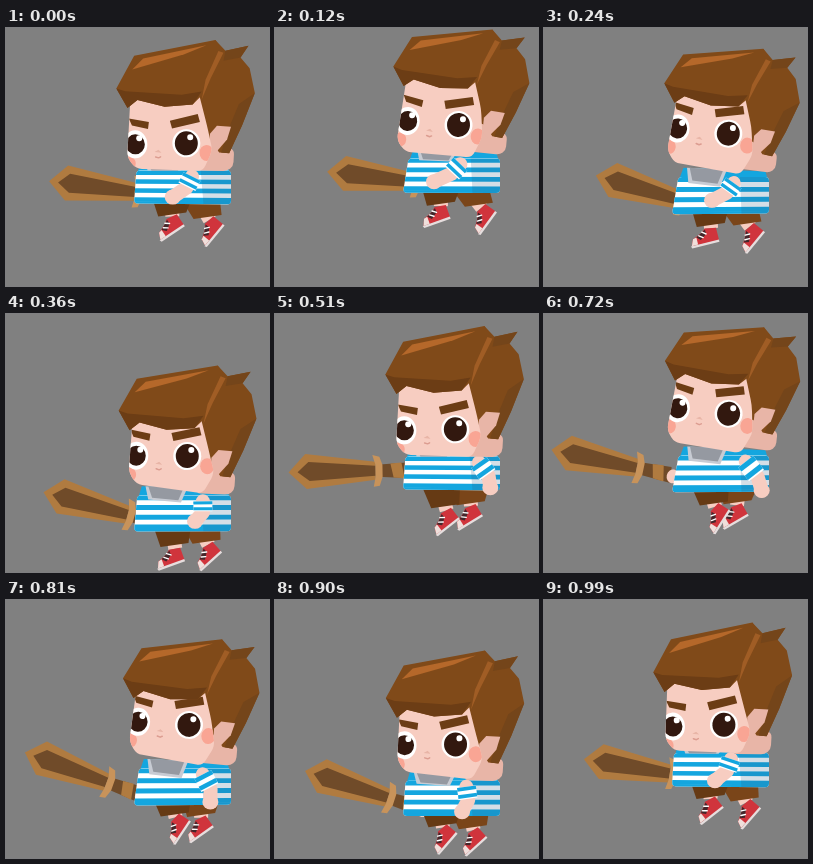
Recreate the animation shown at these times as an HTML page. Size 263 px wide and 258 px high, loop 1020 ms.

```html
<!DOCTYPE html>
<html lang="en">
<head>
<meta charset="utf-8">
<title>Running boy with a wooden sword</title>
<style>
html, body { margin: 0; width: 100%; height: 100%; overflow: hidden; background: #808080; }
svg { display: block; width: 100%; height: 100%; }
</style>
</head>
<body>
<svg id="stage" viewBox="0 0 263 258"></svg>
<script>
const LOOP = 1020, STEP = 30, HOP = LOOP / 2;
const SKIN = '#f7cdc1', SHADE = '#e8b5a7', HAIR = '#804a19', BACK = '#74451a', DARK = '#6c3d15',
  LIGHT = '#b5682a', BLUE = '#14a6df', RED = '#d0343c', PUPIL = '#32180f',
  WOOD = '#b07b40', CORE = '#704b29';

// Swing around a mean, highest at the peak time.
const wave = (t, mean, amp, peak, period = LOOP) => mean + amp * Math.cos(2 * Math.PI * (t - peak) / period);

// The body hops twice per loop, the limbs swing once.
function pose(t) {
  const rise = wave(t, 11, 26, 365, HOP) + wave(t, 0, -4, 0, HOP / 2);
  const sway = wave(t, 3, 6, 200, HOP);
  const nod = wave(t, 8.5, -8.5, 15, HOP);
  const shoulder = [wave(t, 195, -10, 75), 147];
  const hand = [wave(t, 191, -32, 115), wave(t, 170, 6, 700)];
  return {
    rise, sway, nod, shoulder, hand,
    elbow: [(shoulder[0] + hand[0]) / 2 + 4, (shoulder[1] + hand[1]) / 2 + 1],
    sword: [wave(t, 116, 24, 150), wave(t, 159, 6, 150), wave(t, 10, 9, 310, HOP) + wave(t, 0, 4, 0)],
    left: [wave(t, 167, -7, 180), wave(t, 203.5, -4, 0), wave(t, -36, 22, 240)],
    right: [wave(t, 199, 10, 150), 203, wave(t, -41, -13, 120)]
  };
}

const mix = (a, b, s) => [a[0] + (b[0] - a[0]) * s, a[1] + (b[1] - a[1]) * s];
const poly = (pts, fill, extra = '') => `<polygon points="${pts}" fill="${fill}" ${extra}/>`;
const oval = (x, y, rx, ry, fill) => `<ellipse cx="${x}" cy="${y}" rx="${rx}" ry="${ry}" fill="${fill}"/>`;
const line = (pts, color, width, cap = 'round') =>
  `<polyline points="${pts.join(' ')}" fill="none" stroke="${color}" stroke-width="${width}" stroke-linecap="${cap}" stroke-linejoin="round"/>`;
const group = (transform, body) => `<g transform="${transform}">${body}</g>`;
const place = (x, y, angle) => `translate(${x} ${y}) rotate(${angle})`;

// Closed path with softened corners.
function soft(pts, radius) {
  const n = pts.length;
  const toward = (a, b) => mix(a, b, Math.min(0.5, radius / Math.hypot(b[0] - a[0], b[1] - a[1])));
  return pts.map((p, i) =>
    `${i ? 'L' : 'M'}${toward(p, pts[(i + n - 1) % n])}Q${p} ${toward(p, pts[(i + 1) % n])}`).join('') + 'Z';
}

// Affine matrix from the resting hair corners: left, top and right.
function hairMatrix(sway, rise) {
  const ux = 99, uy = -48, vx = 138, vy = 5, det = ux * vy - uy * vx;
  const solve = (p, q) => [(p * vy - q * uy) / det, (q * ux - p * vx) / det];
  const lx = 112 + sway, ly = 57 + rise - 1.2 * sway;
  const tx = 211 + sway, ty = 11 + rise + 0.2 * sway;
  const rx = 250 + 0.7 * sway, ry = 63 + rise + 0.3 * sway;
  const [a, c] = solve(tx - lx, rx - lx), [b, d] = solve(ty - ly, ry - ly);
  return [a, b, c, d, lx - a * 112 - c * 57, ly - b * 112 - d * 57];
}
const apply = ([a, b, c, d, e, f], [x, y]) => [a * x + c * y + e, b * x + d * y + f];

function turn(x, y, angle, [px, py]) {
  const r = angle * Math.PI / 180, c = Math.cos(r), s = Math.sin(r);
  return [x + px * c - py * s, y + px * s + py * c];
}

// Drawn around the guard, blade to the left.
function sword([x, y, angle]) {
  return group(place(x, y, angle),
    poly('0,-6 33,-8 36,8 0,6', CORE) +
    poly('14,-7 25,-8 28,8 17,7', WOOD) +
    oval(36, 1, 6, 7, SKIN) +
    poly('-88,0 -71,-18 -1,-9 -1,9 -70,17', WOOD) +
    poly('-79,0 -68,-10 -1,-5 -1,5 -67,9', CORE) +
    poly('-4,-16 3,-14 6,-6 6,6 3,15 -3,16 -1,6 -1,-6', '#c8935a'));
}

function shoe([x, y, angle]) {
  return group(place(x, y, angle) + ' scale(.93)',
    poly('-15,4 -12,-3 -2,-7 3,-11 15,-9 15,5', RED) +
    poly('-16,4 15,4 15,6.5 -15,6.5', '#e6dede') +
    poly('-15,4 -12,-3 -8,-4 -8,4', '#f0dfdb') +
    poly('-8,-4 -2,-7 3,-10 3,-5 -4,0', '#43262a') +
    line([[-5, -5], [-1, -2]], '#fff', 1.5) + line([[-1, -8], [3, -5]], '#fff', 1.5));
}

function leg(hip, foot, color) {
  const ankle = turn(...foot, [9, -9]), hem = mix(hip, ankle, 0.75);
  const shorts = [[hip[0] - 19, hip[1] - 4], [hip[0] + 19, hip[1] - 4], [hem[0] + 14, hem[1] - 1], [hem[0] - 14, hem[1] + 3]];
  return line([hip, ankle], SKIN, 14, 'butt') + shoe(foot) + poly(shorts.join(' '), color);
}

function shirt(sway, nod) {
  const tl = [131 + 0.4 * sway, 141], bl = [128, 174 + 0.25 * nod];
  const tr = [225, 141], br = [225, 175 + 0.15 * nod];
  const at = (u, v) => mix(mix(tl, tr, u), mix(bl, br, u), v);
  const area = (...uv) => uv.map(p => at(...p)).join(' ');
  const d = soft([tl, tr, br, bl], 4);
  let bands = '';
  for (let i = 0; i < 7; i += 2)
    bands += poly(area([-0.1, i / 7.4], [1.1, i / 7.4], [1.1, (i + 1) / 7.4], [-0.1, (i + 1) / 7.4]), BLUE);
  bands += poly(area([-0.1, 0.93], [1.1, 0.93], [1.1, 1.1], [-0.1, 1.1]), BLUE);
  const collar = 0.016 * nod;
  return poly(area([0.04, -0.25], [0.96, -0.15], [0.99, 0.1], [0.01, 0.1]), BLUE) +
    `<clipPath id="shirt"><path d="${d}"/></clipPath><path d="${d}" fill="#fff"/>` +
    `<g clip-path="url(#shirt)">${bands}` +
    poly(area([0.68, 0], [1.1, 0], [1.1, 1.1], [0.72, 1.1]), '#2b5d82', 'opacity=".2"') + '</g>' +
    poly(area([0.08, -0.25], [0.53, -0.2], [0.47, collar], [0.12, collar * 0.6]), '#c7cbd3') +
    poly(area([0.11, -0.25], [0.49, -0.2], [0.44, collar * 0.7], [0.16, collar * 0.35]), '#9599a1');
}

function arm({ shoulder, elbow, hand }) {
  const end = mix(shoulder, elbow, 0.9);
  let body = line([shoulder, elbow, hand], SKIN, 14) + oval(...hand, 8, 7.5, SKIN) +
    line([shoulder, end], '#fff', 19, 'butt');
  for (const s of [0, 0.6])
    body += line([mix(shoulder, end, s), mix(shoulder, end, s + 0.3)], BLUE, 19, 'butt');
  return body;
}

function features(x, y, tilt) {
  const eye = (ex, rx, r) => oval(ex, 0, rx, 14, '#fff') + oval(ex, 0, r, r + 0.5, PUPIL) + oval(ex + 4, -6, 3, 3, '#fff');
  return group(place(x, y, tilt),
    oval(20, 10, 7, 8, '#f9a594') + oval(-57, 19, 6, 7, '#f9a594') +
    eye(-51, 12, 9.5) + eye(0, 14, 11.5) +
    poly('-57,-26 -37,-22 -38,-15 -54,-19', DARK) +
    poly('-16,-23 12,-29 14,-21 -14,-15', DARK) +
    poly('-32,8 -28,6 -25,9', SHADE) +
    line([[-31, 13], [-28, 14], [-26, 13]], '#dc9d91', 1.5));
}

const backHair =
  poly('203,20 211,9 221,20 244,15 236,27 245,38 250,63 237,96 224,124 214,123 207,112 202,110 190,70', HAIR) +
  poly('250,63 237,96 224,124 216,123 224,98 234,74', BACK) +
  poly('221,20 244,15 236,27 219,30', BACK);
const ear = poly('205,104 212,96 226,97 222,110 209,125 204,119', SHADE);
const frontHair =
  poly('112,57 130,24 211,9 219,21 203,46 196,66 188,74 160,76 133,69 123,77', HAIR) +
  poly('112,57 121,60 177,64 197,61 188,74 160,76 133,69 123,77', DARK) +
  poly('128,38 139,27 202,14 180,23', LIGHT) +
  poly('197,69 201,49 214,20 219,22 206,48', '#a05d25');

function head({ rise, sway, nod }) {
  const hair = hairMatrix(sway, rise), matrix = `matrix(${hair})`;
  const chinY = 140 + rise - 0.5 * nod, chinTilt = 1 + 0.5 * nod;
  const top = p => apply(hair, p), low = p => turn(163, chinY, chinTilt, p);
  const neck = soft([[203, 108], [229, 121], [228, 137], [222, 142], [190, 141]].map(top), 4);
  const face = soft([
    ...[[126, 66], [193, 58], [202, 95]].map(top),
    ...[[43, -20], [34, 1], [-33, 0], [-42, -11]].map(low)], 6);
  return `<path d="${neck}" fill="${SHADE}"/>` + group(matrix, backHair + ear) +
    `<clipPath id="face"><path d="${face}"/></clipPath><path d="${face}" fill="${SKIN}"/>` +
    `<g clip-path="url(#face)">${features(181 + 0.4 * sway, 114 + rise - nod, 0.7 * sway)}</g>` +
    group(matrix, frontHair);
}

const stage = document.getElementById('stage');
function draw(t) {
  const p = pose(t);
  stage.innerHTML = '<rect width="263" height="258" fill="#808080"/>' +
    group(`translate(0 ${p.rise})`,
      sword(p.sword) +
      leg([195, 175], p.right, '#7a4519') +
      leg([166, 175], p.left, '#663a14') +
      shirt(p.sway, p.nod) +
      arm(p)) +
    head(p);
}

let shown = -1;
function tick() {
  const t = Math.floor(performance.now() % LOOP / STEP) * STEP;
  if (t !== shown) draw(shown = t);
  requestAnimationFrame(tick);
}
tick();
</script>
</body>
</html>
```
